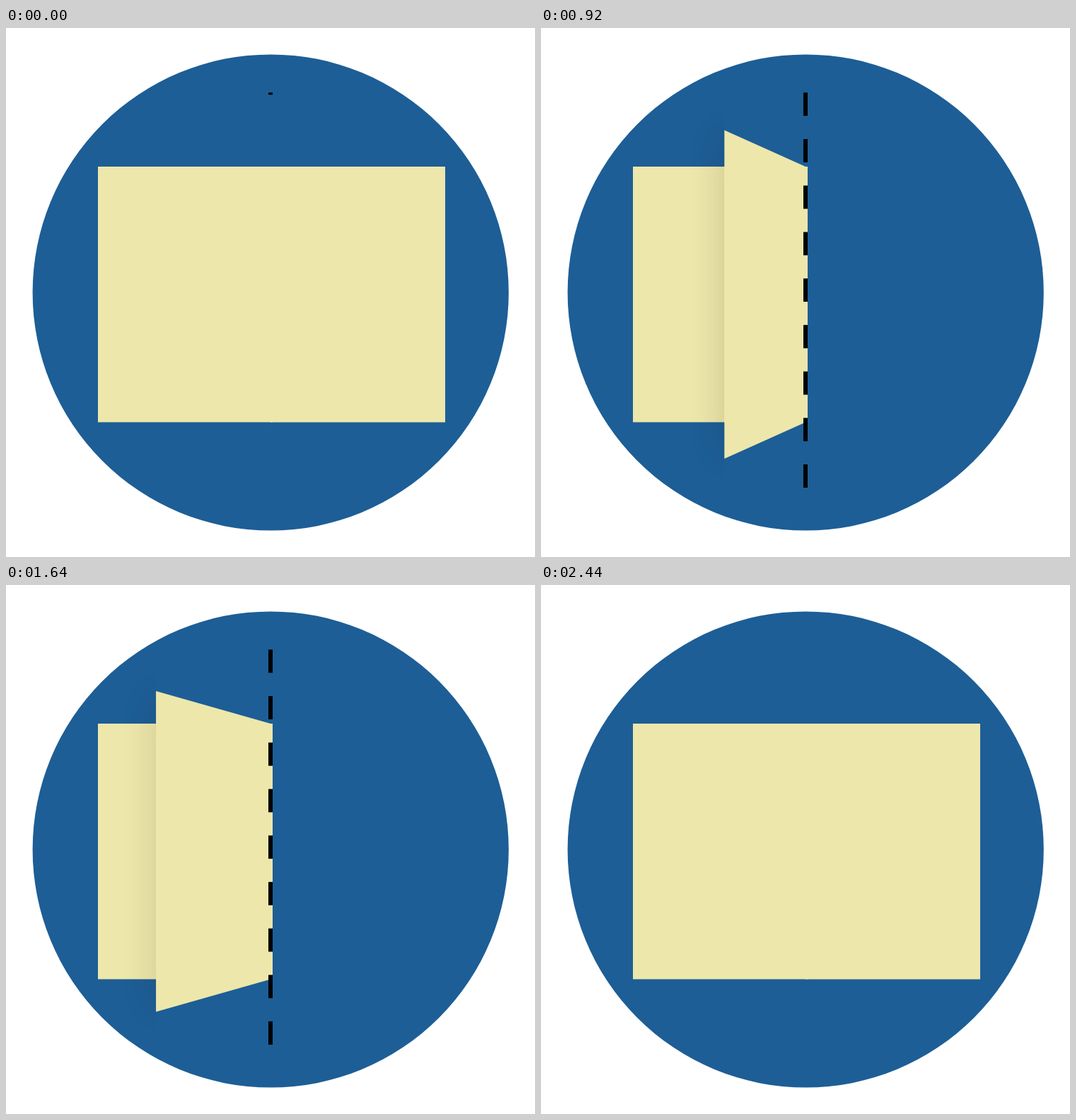
An HTML page with a canvas that plays this animation: 748x748 px, repeating every 3040 ms.

```html
<!DOCTYPE html>
<html lang="en">
<head>
<meta charset="utf-8">
<title>Fold in half</title>
<style>
  html, body { margin: 0; width: 100%; height: 100%; overflow: hidden; background: #fff; }
  canvas { display: block; }
</style>
</head>
<body>
<canvas id="stage" width="748" height="748"></canvas>
<script>
const ctx = document.getElementById("stage").getContext("2d");

const LOOP = 3040, TICK = 40;
const BLUE = "#1d5e96", CREAM = "#ede7ab";
const HINGE = 374, MID = 376.7, HALF = 180.7, FLAP = 247, PERSPECTIVE = 0.238;
const MAX_ANGLE = 140;
const LINE = { top: 91.3, length: 558.7, dash: 32.9, period: 65.72, start: 3 };

// Cubic Bezier easing with control points (a, 0) and (b, 1).
function ease(p, a, b) {
  if (p <= 0) return 0;
  if (p >= 1) return 1;
  let lo = 0, hi = 1, s = 0.5;
  for (let i = 0; i < 24; i++) {
    s = (lo + hi) / 2;
    const q = 1 - s;
    const x = 3 * q * q * s * a + 3 * q * s * s * b + s ** 3;
    if (x < p) lo = s; else hi = s;
  }
  return s * s * (3 - 2 * s);
}

function foldAngle(t) {
  const fold = ease((t - 440) / 1000, 0.3315, 0.148);
  const unfold = ease((t - 1480) / 800, 0.382, 0.27);
  return MAX_ANGLE * (fold - unfold);
}

function lineLength(t) {
  if (t >= 2440) return 0;
  const p = t < 1400 ? t / 280 : (2400 - t) / 280;
  return LINE.start + (LINE.length - LINE.start) * ease(p, 0.33, 0.67);
}

function drawShadow(edge, half, alpha) {
  const x = Math.min(edge, HINGE);
  const h = edge < HINGE ? half - 12 : HALF;
  const away = 2000;
  ctx.save();
  ctx.beginPath();
  ctx.rect(0, 0, x, 748);
  ctx.clip();
  ctx.shadowColor = `rgba(40, 25, 20, ${alpha})`;
  ctx.shadowBlur = 50;
  ctx.shadowOffsetX = away;
  ctx.fillRect(x - away, MID - h, 150, h * 2);
  ctx.restore();
}

function drawFlap(degrees, returning) {
  const a = degrees * Math.PI / 180;
  const scale = 1 / (1 - PERSPECTIVE * Math.sin(a));
  const edge = HINGE + FLAP * Math.cos(a) * scale;
  const half = HALF * scale;
  if (degrees > 50) {
    drawShadow(edge, half, 0.24 * (degrees / 128) ** 2 * (returning ? 0.72 : 1));
  }
  ctx.fillStyle = CREAM;
  ctx.beginPath();
  ctx.moveTo(HINGE, MID - HALF);
  ctx.lineTo(edge, MID - half);
  ctx.lineTo(edge, MID + half);
  ctx.lineTo(HINGE, MID + HALF);
  ctx.fill();
}

function drawLine(length) {
  ctx.fillStyle = "#000";
  for (let y = 0; y < length; y += LINE.period) {
    ctx.fillRect(371, LINE.top + y, 6, Math.min(LINE.dash, length - y));
  }
}

function draw(t) {
  ctx.fillStyle = "#fff";
  ctx.fillRect(0, 0, 748, 748);
  ctx.fillStyle = BLUE;
  ctx.beginPath();
  ctx.arc(374.2, 374, 336.6, 0, Math.PI * 2);
  ctx.fill();
  ctx.fillStyle = CREAM;
  ctx.fillRect(130, MID - HALF, 247, HALF * 2);
  drawFlap(foldAngle(t), t > 1480);
  drawLine(lineLength(t));
}

const begin = performance.now();
function loop() {
  const t = (performance.now() - begin) % LOOP;
  draw(Math.floor(t / TICK) * TICK);
  requestAnimationFrame(loop);
}
loop();
</script>
</body>
</html>
```
